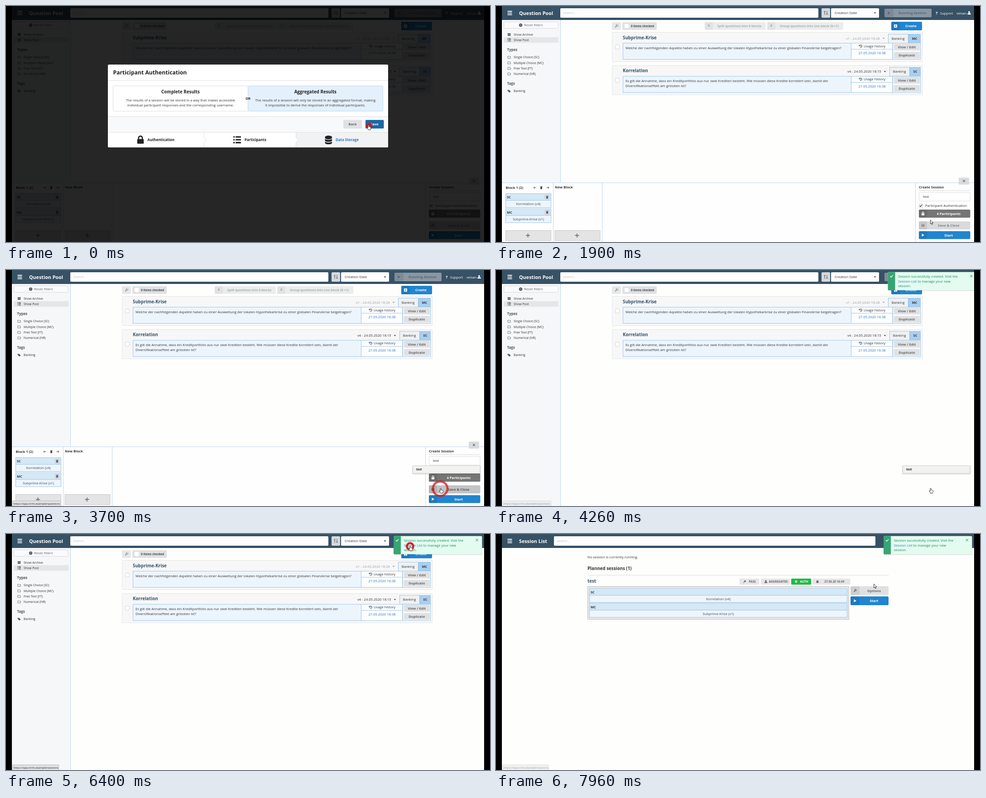
Animation, 1069 px wide and 524 px high, one loop 8 s. Source, as an HTML page:

```html
<!DOCTYPE html>
<html lang="en">
<head>
<meta charset="utf-8">
<title>Question pool walkthrough</title>
<style>
html, body { margin: 0; width: 100%; height: 100%; overflow: hidden; background: #000; }
svg { display: block; width: 1069px; height: 524px; font-family: "Open Sans", "Noto Sans", sans-serif; }
text { white-space: pre; }
</style>
</head>
<body>
<svg id="stage" viewBox="0 0 1069 524"></svg>
<script>
const BLUE = '#2185d0', GREY = '#e0e1e2', LINE = '#9cc5e8', NAVY = '#375165', INK = '#333';

// Drawing helpers: all return SVG markup
const box = (x, y, w, h, fill, stroke, r = 0) => stroke
  ? `<rect x="${x + .5}" y="${y + .5}" width="${w - 1}" height="${h - 1}" rx="${r}" fill="${fill}" stroke="${stroke}"/>`
  : `<rect x="${x}" y="${y}" width="${w}" height="${h}" rx="${r}" fill="${fill}"/>`;
const text = (x, y, s, { size = 7.6, fill = INK, bold, mid } = {}) =>
  `<text x="${x}" y="${y}" font-size="${size}" fill="${fill}"${bold ? ' font-weight="700"' : ''}${mid ? ' text-anchor="middle"' : ''}>${s}</text>`;
const bold = (x, y, s, size, fill, mid) => text(x, y, s, { size, fill, bold: true, mid });
const mid = (x, y, s, size, fill) => text(x, y, s, { size, fill, mid: true });
const line = (d, stroke, w = 1) => `<path d="${d}" fill="none" stroke="${stroke}" stroke-width="${w}"/>`;
const group = (id, body, extra = '') => `<g id="${id}" ${extra}>${body}</g>`;

// Icons are drawn around 0,0 in a box of about 8 units
const shapes = {
  lock: c => `<rect x="-3.5" y="-.7" width="7" height="5" rx=".7" fill="${c}"/>` + line('M-2 -.5V-2a2 2 0 0 1 4 0V-.5', c, 1.3),
  list: c => line('M-1.6 -3H4M-1.6 0H4M-1.6 3H4M-4 -3h1.5M-4 0h1.5M-4 3h1.5', c, 1.5),
  data: c => `<path d="M-3.7 -2.9a3.7 1.5 0 0 1 7.4 0v.9a3.7 1.5 0 0 1-7.4 0zM-3.7 -.9a3.9 1.5 0 0 0 7.4 0v1.6a3.7 1.5 0 0 1-7.4 0zM-3.7 1.9a3.9 1.5 0 0 0 7.4 0v1.4a3.7 1.5 0 0 1-7.4 0z" fill="${c}"/>`,
  play: c => `<path d="M-2.8 -3.5L3.4 0L-2.8 3.5z" fill="${c}"/>`,
  bolt: c => `<path d="M-1 -4H2L.8 -1.3H2.6L-1 4L0 .3H-2.2z" fill="${c}"/>`,
  trash: c => `<path d="M-2.4 -1.8H2.4L2 3.6H-2zM-3 -3.2H-1L-.6 -3.8H.6L1 -3.2H3V-2.4H-3z" fill="${c}"/>`,
  wrench: c => line('M-3 3L1 -1', c, 1.8) + line('M3.4 -2.4A2 2 0 1 1 1.8 -3.6', c, 1.4),
  save: c => `<path d="M-3.2 -3.2H2L3.2 -2V3.2H-3.2z" fill="${c}"/>` + line('M-2 -1.7H1', '#ddd', 1.4) + line('M-.8 1.4H.8', '#ddd', 1.6),
  plus: c => line('M-4.5 0H4.5M0 -4.5V4.5', c, 1.8),
  add: c => `<rect x="-3.9" y="-3.9" width="7.8" height="7.8" rx="1" fill="${c}"/>` + line('M-2.5 0H2.5M0 -2.5V2.5', BLUE, 1.1),
  cross: c => line('M-2.5 -2.5L2.5 2.5M2.5 -2.5L-2.5 2.5', c, 1.1),
  check: c => line('M-3 0L-1 2.2L3 -2.4', c, 1.4),
  caret: c => `<path d="M-2.4 -1.2H2.4L0 1.4z" fill="${c}"/>`,
  folder: c => line('M-3.2 -2.5H-.8L0 -1.6H3.2V2.7H-3.2z', c, .8),
  tag: c => `<path d="M-3.6 -3H-.3L3.6 .8L.8 3.6L-3.6 -.2z" fill="${c}"/><circle cx="-2" cy="-1.6" r=".7" fill="#fff"/>`,
  archive: c => `<path d="M-3.6 -3H3.6V-1.2H-3.6zM-3.2 -.8H3.2V3.2H-3.2z" fill="${c}"/>` + line('M-1 .5H1', '#fff', .8),
  history: c => line('M-2.9 -1A3.1 3.1 0 1 1 -2.2 2.2M0 -1.7V.2L1.3 1', c, 1) + `<path d="M-4 -3.2V-.2H-1z" fill="${c}"/>`,
  user: c => `<circle cy="-1.9" r="2" fill="${c}"/><path d="M-3.6 3.6V2Q-3.4 .4 -1.8 .3H1.8Q3.4 .4 3.6 2V3.6z" fill="${c}"/>`,
  left: c => line('M3 0H-2.4M-.3 -2L-2.5 0L-.3 2', c, .9),
  right: c => line('M-3 0H2.4M.3 -2L2.5 0L.3 2', c, .9),
  key: c => `<circle cx="1.2" cy="-1.2" r="2.2" fill="${c}"/>` + line('M0 0L-3 3', c, 1.4),
  shield: c => `<path d="M0 -3.4L3 -2.2Q3 2 0 3.4Q-3 2 -3 -2.2z" fill="${c}"/>` + line('M.7 -1.8V1.6', '#21ba45', 1.2),
  date: c => `<path d="M-2.8 -2.6H2.8V-1.2H-2.8zM-2.8 -.8H2.8V3.2H-2.8z" fill="${c}"/>` + line('M-1.4 -3.4V-2M1.4 -3.4V-2', c, .9)
};
const icon = (name, x, y, c = INK, k = 1) => `<g transform="translate(${x} ${y}) scale(${k})">${shapes[name](c)}</g>`;

// Button with a darker icon strip on its left
const button = (x, y, w, h, label, ic, fill, ink, strip = 19, size = 7.6, shade = .08) =>
  box(x, y, w, h, fill, 0, 2) + `<rect x="${x}" y="${y}" width="${strip}" height="${h}" rx="2" opacity="${shade}"/>` +
  icon(ic, x + strip / 2, y + h / 2, ink, .9) + bold(x + (w + strip) / 2, y + h / 2 + 2.8, label, size, ink, true);

const header = (title, x, w) => box(13, 0, 1043, 31, NAVY) + line('M25.5 11.8H35.5M25.5 15.6H35.5M25.5 19.4H35.5', '#fff', 1.9) +
  bold(51, 19.6, title, 10.73, '#fff') + box(x, 5, w, 21, '#fff', 0, 2) + text(x + 5.5, 18.4, 'Search...', { fill: '#c2c2c2' });

function sidebar() {
  const row = (y, ic, label) => icon(ic, 29, y, '#555', .95) + text(39, y + 2.6, label, { size: 6.9 });
  return box(13, 31, 129, 493, '#f5f7f9') + line('M142.5 31V524', '#b9d6ee') +
    box(17, 35, 121, 15, '#fbfbfb', '#d9d9d9', 2) + '<circle cx="54.5" cy="42.4" r="3.7" fill="#555"/>' +
    icon('cross', 54.5, 42.4, '#fff', .55) + text(62, 45, 'Reset filters', { fill: '#666' }) +
    box(17, 69, 121, 12.5, '#e5e6e7', 0, 1) + row(63.3, 'archive', 'Show Archive') + row(75.3, 'list', 'Show Pool') +
    bold(24.5, 100, 'Types', 8, '#555') + bold(24.5, 175, 'Tags', 8, '#555') +
    ['Single Choice (SC)', 'Multiple Choice (MC)', 'Free Text (FT)', 'Numerical (NR)']
      .map((s, i) => row(113.8 + i * 12.3, 'folder', s)).join('') + row(188.8, 'tag', 'Banking');
}

function card(y, title, version, vx, vInk, type, lines) {
  const tagX = vx + 93;
  const action = (dy, s) => box(879, y + dy, 57, 14.6, GREY, 0, 2) + bold(907.3, y + dy + 10.2, s, 7.6, '#666', true);
  return box(256, y, 686, 66, '#f7f7f8', '#e4e5e6') + bold(280, y + 15.8, title, 9.8, NAVY) +
    box(263, y + 28, 10, 10, '#fff', '#d6d6d6', 1.5) + text(vx, y + 16.5, version, { fill: vInk }) +
    icon('caret', vx + 83, y + 14, vInk) +
    box(tagX, y + 4, 45, 21, '#eff1f2', LINE) + text(tagX + 7.8, y + 16.7, 'Banking') +
    box(tagX + 45, y + 4, 938 - tagX - 45, 21, '#a9cff0', LINE) + bold((tagX + 983) / 2, y + 16.7, type, 7.4, INK, true) +
    box(876, y + 24, 62, 37, '#f8fafb', LINE) + box(280, y + 24, 505, 37, '#edf5fc', LINE) +
    lines.map((s, i) => text(286, y + 37.5 + i * 10.9, s)).join('') +
    box(784, y + 24, 92.5, 37, '#fdfefe', LINE) + line(`M785 ${y + 38}H876`, LINE) +
    icon('history', 805.5, y + 31, INK, .95) + text(812, y + 33.6, 'Usage history') + mid(830.5, y + 49, '27.05.2020 16:38', 7.6, '#2a70c0') +
    action(26, 'View / Edit') + action(44, 'Duplicate');
}

const pool = () => box(13, 0, 1043, 524, '#fefefd') + header('Question Pool', 142, 570) +
  box(719, 5, 19, 21, '#d5d9dd', 0, 2) + line('M726 19.5V11.5M724.4 13.2L726 11.4L727.6 13.2M731 11V19M729.4 17.4L731 19.2L732.6 17.4', '#555', 1) +
  box(740, 5, 106, 21, '#fff', 0, 2) + text(748, 18.2, 'Creation Date', { size: 7.7 }) + icon('caret', 837, 15.5) +
  button(858, 6, 104, 19, 'Running Session', 'play', '#8997a3', '#536878', 20) +
  bold(971, 19, '?', 9.5, '#fff') + text(981, 18.5, 'Support', { fill: '#fff' }) + text(1017, 18.5, 'velsan', { fill: '#fff' }) + icon('user', 1045, 15.5, '#fff') +
  sidebar() +
  box(256, 36, 20, 17, '#e7e8e9', 0, 2) + icon('wrench', 266, 44.5, '#999') +
  box(279, 36, 76, 17, GREY, 0, 2) + box(284, 39.5, 9.5, 9.5, '#fff', 0, 1.5) + bold(298, 47, '0 items checked', 6.4, '#444') +
  button(873, 35, 68, 19, 'Create', 'add', BLUE, '#fff') +
  card(58, 'Subprime-Krise', 'v1 - 24.05.2020 18:28', 773, '#a0a0a0', 'MC',
    ['Welche der nachfolgenden Aspekte haben zu einer Ausweitung der lokalen Hypothekarkrise zu einer globalen Finanzkrise beigetragen?']) +
  card(131.6, 'Korrelation', 'v4 - 24.05.2020 18:15', 776, INK, 'SC',
    ['Es gilt die Annahme, dass ein Kreditportfolio aus nur zwei Krediten besteht. Wie müssen diese Kredite korreliert sein, damit der',
      'Diversifikationseffekt am grössten ist?']);

const item = (x, y, w, type, name) => box(x, y, w, 32, '#eef5fc', LINE) + box(x + 1, y + 1, w - 2, 15, '#d5e8f6') +
  line(`M${x} ${y + 15.5}H${x + w}`, LINE) + bold(x + 3, y + 11.3, type, 7.4) + mid(x + w / 2, y + 26.4, name, 7.6, '#3c4a57');

// Session editor: bottom drawer and the block buttons of the toolbar
function panel() {
  const slot = x => box(x, 498, 101, 23.5, '#e4e4e5', '#c6c6c6') + icon('plus', x + 49.5, 509.5, '#777');
  const bin = y => box(107.5, y, 11, 11, '#cfd6dc', 0, 1.5) + icon('trash', 113, y + 5.5, '#555', .85);
  return button(461, 36, 135, 17, 'Split questions into 0 blocks', 'bolt', '#ebecec', '#abacad', 18, 7, .04) +
    button(599, 36, 168, 17, 'Group questions into one block (0-&gt;1)', 'bolt', '#ebecec', '#abacad', 18, 7, .04) +
    box(13, 392, 1043, 132, '#fefefe') + line('M13 392.5H1056M126.5 392V524M234.5 392V524M926.5 392V524', '#bcd7ed') +
    box(1022, 381, 23, 15.5, '#dadbdc', 0, 1.5) + icon('cross', 1033.5, 388.6, '#555', .95) +
    bold(21.5, 406, 'Block 1 (2)', 7.6) + icon('left', 85.5, 403.3) + icon('trash', 100, 403.3, '#444', .9) + icon('right', 114.5, 403.3) +
    bold(130, 404.6, 'New Block', 7.6) +
    item(21, 416, 101, 'SC', 'Korrelation (v4)') + bin(419) + item(21, 449.5, 101, 'MC', 'Subprime-Krise (v1)') + bin(452.5) +
    slot(21) + slot(129.5) + bold(934, 404.5, 'Create Session', 7.6) + line('M934 409.5H1048', '#d9d9d9') +
    box(934, 413, 113.5, 20.5, '#fff', '#dcdcdc', 2) + text(943, 426, 'test') +
    box(934, 439, 9, 9, '#fff', '#ccc', 1.5) + icon('check', 938.5, 443.3, '#222', .9) + text(948, 446.2, 'Participant Authentication') +
    button(934, 452, 113.5, 18, '4 Participants', 'lock', '#767676', '#fff', 18) +
    group('saveIdle', button(934, 478, 113.5, 18, 'Save &amp; Close', 'save', '#d9dadb', '#808182', 18)) +
    group('saveHover', button(934, 478, 113.5, 18, 'Save &amp; Close', 'save', '#c3c4c5', '#555', 18)) +
    button(934, 500, 113.5, 17.5, 'Start', 'play', BLUE, '#fff', 18);
}

function sessions() {
  const chip = (x, w, ic, s, fill = '#e6e6e7', ink = '#666') => box(x, 99, w, 13.5, fill, 0, 1.5) +
    icon(ic, x + 11, 105.8, ink, .85) + bold(x + (w + 13) / 2, 108.2, s, 6.45, ink, true);
  return box(13, 0, 1043, 524, '#fefefd') + header('Session List', 128, 710) +
    text(202, 54.3, 'No session is currently running.') + bold(202, 80.3, 'Planned sessions (1)', 9.75) +
    line('M202 91.5H867', '#dcdcdc') + bold(202, 108.3, 'test', 9.75, NAVY) +
    chip(538, 43.5, 'key', 'PASS') + chip(585, 64, 'user', 'AGGREGATED') + chip(652, 44, 'shield', 'AUTH', '#21ba45', '#fff') +
    chip(699, 83.5, 'date', '27.05.20 16:49') +
    box(202, 116, 578, 74, '#e8e8e9', '#bdbdbd') + item(206, 120.5, 570, 'SC', 'Korrelation (v4)') + item(206, 153.5, 570, 'MC', 'Subprime-Krise (v1)') +
    button(783, 116, 84, 19.5, 'Options', 'wrench', '#dfe0e1', '#666', 20) + button(783, 138.5, 84, 19.5, 'Start', 'play', BLUE, '#fff', 20);
}

const modal = () => box(225, 130, 619, 184, '#fff', 0, 2.5) + bold(236.5, 152, 'Participant Authentication', 12.17, '#222') +
  line('M225 165.5H844M225 245.5H844', '#e0e1e2') + box(236, 177, 299, 57, '#fff', '#d9dde0', 2) + box(534, 177, 299, 57, '#e4f0fb', '#bcd7ec', 2) +
  bold(385.5, 193.7, 'Complete Results', 9.75, '#222', true) + bold(683.3, 193.7, 'Aggregated Results', 9.75, '#222', true) +
  mid(385.5, 212.3, 'The results of a session will be stored in a way that makes accessible') +
  mid(385.5, 223, 'individual participant responses and the corresponding username.') +
  mid(683.3, 212.3, 'The results of a session will only be stored in an aggregated format, making') +
  mid(683.3, 223, 'it impossible to derive the responses of individual participants.') + bold(534.5, 207.6, 'OR', 7.6, '#222', true) +
  box(225, 246, 619, 34, '#f8f9fb') + box(745, 253, 41, 19, GREY, 0, 2) + bold(765.5, 265.3, 'Back', 7.6, '#666', true) +
  box(794, 253, 40.5, 19, '#1a69a4', 0, 2) + bold(814, 265.3, 'Save', 7.7, '#fff', true) +
  line('M225 280.5H844', '#e2e3e4') + '<path d="M640 281H844V312a2 2 0 0 1-2 2H640V303L645 297L640 291z" fill="#f1f2f4"/>' +
  line('M437.5 281V291L442.5 297L437.5 303V314M640.5 281V291L645.5 297L640.5 303V314', '#dddedf') +
  icon('lock', 297, 297, '#222', 2.05) + bold(312.5, 300, 'Authentication', 7.9, '#222') +
  icon('list', 510.5, 297, '#222', 2.1) + bold(527, 300, 'Participants', 7.9, '#222') +
  icon('data', 712.3, 297, '#222', 2.1) + bold(728, 300, 'Data Storage', 7.9, '#2d78c8');

const toast = () => box(856, 5.5, 196, 41, 'rgba(0,0,0,.12)', 0, 2.5) + box(856, 4.5, 195.5, 40.5, '#e3fcef', 0, 2.5) +
  '<path d="M872 4.5V45H858.5a2.5 2.5 0 0 1-2.5-2.5V7a2.5 2.5 0 0 1 2.5-2.5z" fill="#36a574"/>' +
  icon('check', 864, 14, '#fff') + icon('cross', 1040.3, 13.5, '#6fab94') +
  ['Session successfully created. Visit the', '<tspan fill="#2b79bf">Session List</tspan> to manage your new', 'session.']
    .map((s, i) => text(878.7, 17 + i * 10.6, s, { fill: '#1f825c' })).join('');

const status = (id, w, page) => group(id, box(14, 512, w, 13, '#e1e1e1', '#b8b8b8', 1.5) +
  text(17, 520.6, 'https://app.tirrlo.example/' + page, { size: 6.05, fill: '#222' }));

const popup = () => box(897, 434, 152, 20, 'rgba(0,0,0,.1)', 0, 2) + box(898, 434, 149.5, 18, '#f2f2f1', '#d0d0d0', 1) + bold(906, 445.2, 'test', 6.4, '#222');

const cursor = group('cursor',
  '<path id="arrow" d="M0 0V8.8L2 7L3.5 10.3L4.9 9.7L3.5 6.5H6.2z"/>' +
  '<path id="hand" d="M-1 1Q-1 0 0 0T1 1V4Q2 3.4 2.7 4.3Q3.8 3.9 4.2 4.9Q5.4 4.7 5.4 6V8Q5.2 9 4.6 9.6V11H-.6V10Q-2 8.6 -3.2 6.4Q-3 5.2 -1.9 5.8L-1 6.8z"/>',
  'fill="#fff" stroke="#222" stroke-width=".9" stroke-linejoin="round"');

document.getElementById('stage').innerHTML =
  group('pool', pool()) + group('panel', panel()) + group('sessions', sessions()) +
  group('popup', popup()) + group('toast', toast()) +
  status('linkA', 108, 'questions') + status('linkB', 103, 'sessions') +
  group('dim', box(0, 0, 1069, 524, '#000')) + group('modal', modal()) +
  group('ring', '<circle id="glow" stroke-width="7" opacity=".2"/><circle id="rim" stroke-width="4"/>', 'fill="none" stroke="#d3161d"') +
  box(0, 0, 13, 524, '#000') + box(1056, 0, 13, 524, '#000') + cursor;

const el = {};
document.querySelectorAll('[id]').forEach(n => el[n.id] = n);
const clamp = v => Math.max(0, Math.min(1, v));
const fade = (t, from, to, rise, fall) => clamp((t - from) / rise) * clamp((to - t) / fall);
const show = (n, on) => n.style.display = on ? '' : 'none';
const alpha = (n, a) => { show(n, a > 0); n.style.opacity = a; };

const inOut = p => p < .5 ? 2 * p * p : 1 - 2 * (1 - p) ** 2;
const out = p => 1 - (1 - p) ** 2;
// Pointer stops: time, x, y, easing towards the stop
const path = [[0, 800.5, 264], [950, 800, 264, inOut], [1660, 942, 461, p => p * p * (1.6 - .6 * p)], [1900, 959.5, 475, out],
  [2320, 960, 484.5, inOut], [4640, 960, 484.5, inOut], [5350, 905, 29, inOut], [5900, 892.5, 26.5, out],
  [7660, 892.5, 26.5, out], [7970, 834.5, 111, inOut], [8000, 834.5, 111, out]];
// Clicks: press time, release time, centre
const clicks = [[-300, -120, 802, 266], [2960, 3229, 959, 485.5], [6100, 6220, 892.5, 27.3]];
const RING = 1210;

function pointer(t) {
  const i = Math.max(1, path.findIndex(k => k[0] >= t));
  const [t0, x0, y0] = path[i - 1], [t1, x1, y1, ease] = path[i];
  const p = ease((t - t0) / (t1 - t0));
  return [x0 + (x1 - x0) * p, y0 + (y1 - y0) * p];
}

function ring(t) {
  const c = clicks.find(k => t >= k[0] && t < k[1] + RING);
  show(el.ring, c);
  if (!c) return;
  const [press, release, x, y] = c;
  const u = clamp((t - release) / RING);
  const r = Math.max(25.5 * out(u), 2.8 * clamp((t - press) / 100));
  el.ring.setAttribute('transform', `translate(${x} ${y})`);
  alpha(el.ring, clamp(1 - (u / .84) ** 2));
  el.rim.setAttribute('r', r);
  el.glow.setAttribute('r', r);
}

function draw(t) {
  const late = t >= 6560;
  show(el.pool, !late);
  show(el.sessions, late);
  show(el.panel, t < 4110);
  const hover = t >= 2120;
  show(el.saveIdle, !hover);
  show(el.saveHover, hover);
  alpha(el.popup, fade(t, 2980, 4400, 120, 100));
  alpha(el.linkA, fade(t, 2140, 4350, 120, 200));
  alpha(el.linkB, fade(t, 5370, 8050, 120, 200));

  const closing = clamp((t - 60) / 480);
  alpha(el.dim, .85 * (1 - closing));
  alpha(el.modal, 1 - closing);
  el.modal.setAttribute('transform', `translate(534.5 222) scale(${1 - .1 * out(closing)}) translate(-534.5 -222)`);

  show(el.toast, t >= 4142);
  el.toast.setAttribute('transform', `translate(${215 * (1 - clamp((t - 4142) / 220)) ** 4} 0)`);

  ring(t);
  const hand = t < 480 || (t >= 2120 && t < 4680) || (t >= 5340 && t < 7780);
  show(el.hand, hand);
  show(el.arrow, !hand);
  el.cursor.setAttribute('transform', `translate(${pointer(t)})`);
}

const start = performance.now();
function tick() {
  draw((performance.now() - start) % 8000);
  requestAnimationFrame(tick);
}
tick();
</script>
</body>
</html>
```
